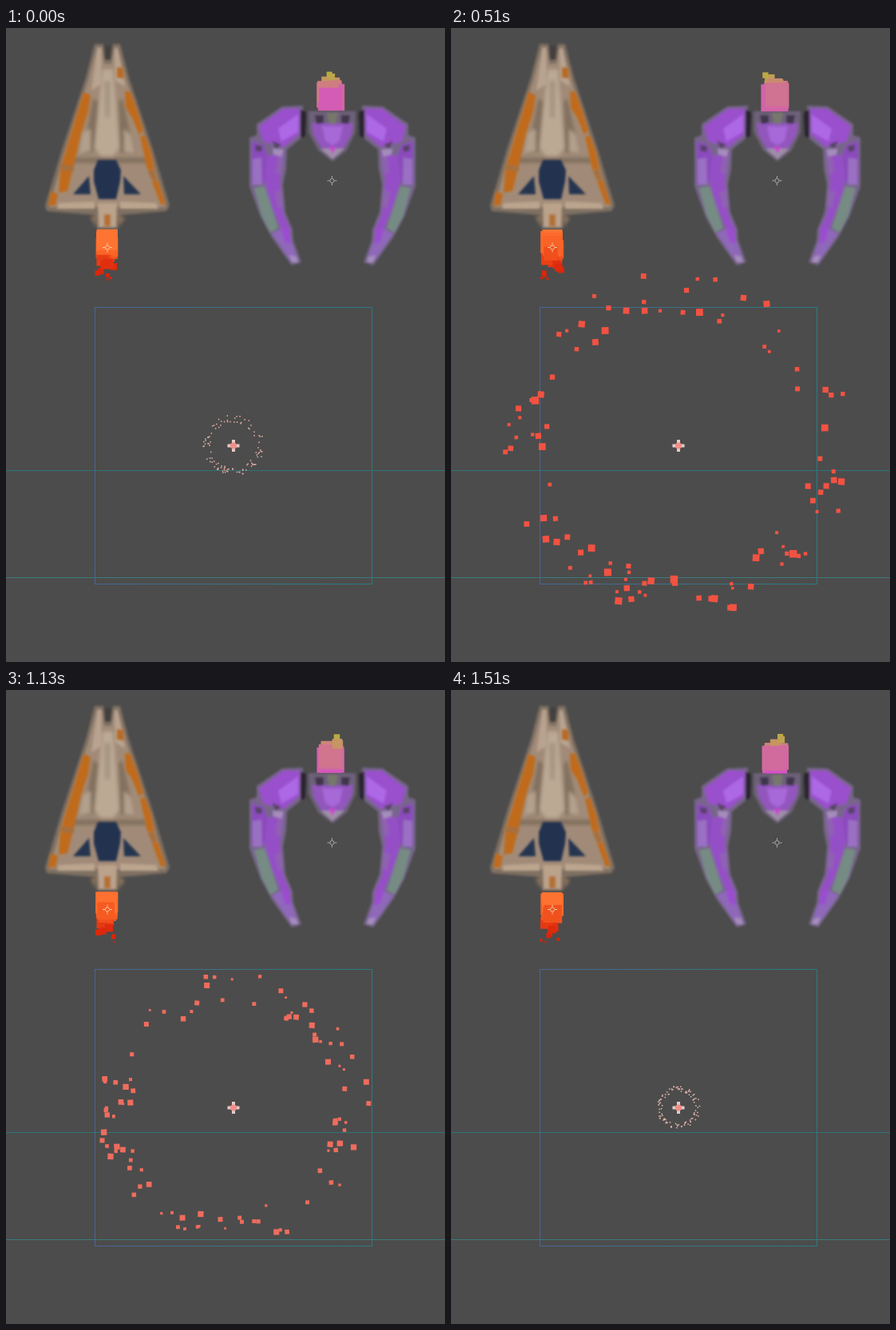
Animation of 550 by 793 pixels, one loop 1600 ms. Source, as an HTML page with a canvas:

```html
<!DOCTYPE html>
<html lang="en">
<head>
<meta charset="utf-8">
<title>Thrusters and burst</title>
<style>
  html, body { margin: 0; width: 100%; height: 100%; overflow: hidden; background: #4c4c4c; }
  svg, canvas { position: absolute; left: 0; top: 0; width: 550px; height: 793px; display: block; }
</style>
</head>
<body>
<svg viewBox="0 0 550 793">
  <defs>
    <filter id="soft" x="-10%" y="-10%" width="120%" height="120%"><feGaussianBlur stdDeviation="1.5"/></filter>
    <filter id="softer" x="-10%" y="-10%" width="120%" height="120%"><feGaussianBlur stdDeviation="2.2"/></filter>
    <linearGradient id="frame"><stop stop-color="#4a6796"/><stop offset=".5" stop-color="#3c7386"/><stop offset="1" stop-color="#267c84"/></linearGradient>
    <g id="arm">
      <path fill="#77658a" d="M305 137L314 134 314 120 346 98 372 97 372 136 352 152 351 176 347 196 350 230 359 252 360 266 370 293 358 297 333 262 319 236 305 198Z"/>
      <path fill="#9a50cc" d="M317 123L347 101 368 101 367 133 348 149 322 142Z"/>
      <path fill="#ad68e6" d="M341 126L366 108 366 130 345 142Z"/>
      <path fill="#8b4cbd" d="M308 142L322 146 328 160 326 192 308 194Z"/>
      <path fill="#9550c6" d="M328 160L348 156 343 190 347 232 357 254 349 262 334 226 324 194Z"/>
      <path fill="#9a70c3" d="M309 164L320 162 321 196 309 196Z"/>
      <path fill="#8e62b0" d="M341 158L348 158 345 184 338 180ZM337 206L345 202 347 222 341 226Z"/>
      <path fill="#768b84" d="M311 200L324 198 341 250 331 256 320 234Z"/>
      <path fill="#8f68ba" d="M333 257L347 250 358 268 366 291 357 292Z"/>
      <path fill="#9b4ed0" d="M344 250L355 254 357 270 349 267Z"/>
      <path fill="#a48dbb" d="M334 151L348 152 345 161 335 158ZM355 284L364 286 366 293 358 293Z"/>
      <path fill="#554263" d="M312 146L321 148 320 155 313 154ZM333 141L345 146 338 151Z"/>
      <path fill="#292332" d="M369 102L376 105 375 135 369 138Z"/>
    </g>
  </defs>

  <g filter="url(#soft)">
    <path fill="#7f6f62" d="M111 20L122 20 124 40 131 40 134 20 143 20 154 62 184 152 205 222 201 229 143 234 140 251 114 251 111 234 51 229 49 222 70 152 100 62Z"/>
    <path fill="#a18b78" d="M114 24L120 24 123 45 132 45 136 24 140 24 151 66 180 154 200 224 54 224 74 154 103 66Z"/>
    <path fill="#b8a390" d="M115 25L119 25 120 70 107 78ZM136 26L140 27 149 73 137 66Z"/>
    <path fill="#43403d" d="M123 22L132 22 131 40 124 40Z"/>
  </g>
  <g filter="url(#softer)">
    <path fill="#83715f" d="M109 88L116 92 110 155 94 158 102 126ZM141 92L146 88 153 120 162 158 143 156ZM78 162L176 162 178 169 76 169Z"/>
    <path fill="#bba994" d="M121 52L134 52 138 100 142 150 134 160 119 160 111 150 116 100Z"/>
    <path fill="#a69583" d="M123 66L131 66 130 112 124 112Z"/>
    <path fill="#b3a08c" d="M96 132L106 126 106 154 92 157ZM148 126L156 134 161 157 148 155Z"/>
    <path fill="#8e735a" d="M106 237L113 233 113 249ZM141 233L149 238 141 249Z"/>
  </g>
  <g filter="url(#soft)">
    <path fill="#c06b1b" d="M97 80L106 84 103 105 94 132 85 172 77 204 66 206 68 176 83 126ZM56 204L65 208 62 222 53 222Z"/>
    <path fill="#c06b1b" d="M149 79L156 80 164 102 172 128 167 134 158 112 150 100ZM168 136L174 134 182 156 186 178 177 177ZM183 192L190 190 200 220 194 221Z"/>
    <path fill="#b66a28" d="M139 49L147 50 148 63 139 62Z"/>
    <path fill="#a5703c" d="M68 170L86 173 84 180 67 177ZM177 178L186 178 190 190 183 191Z"/>
    <path fill="#233250" d="M115 165L138 165 144 178 143 192 138 214 116 214 110 192 110 178Z"/>
    <path fill="#263550" d="M84 208L104 185 106 208ZM147 185L169 208 148 208Z"/>
    <path fill="#bca58e" d="M66 219L111 217 111 226 64 226ZM143 217L188 219 191 226 143 226Z"/>
    <path fill="#bba28a" d="M115 219L139 219 138 249 116 249Z"/>
    <path fill="#b26f30" d="M123 233L131 233 131 248 123 248Z"/>
  </g>

  <g filter="url(#soft)">
    <use href="#arm"/>
    <use href="#arm" transform="translate(818) scale(-1 1)"/>
    <path fill="#6e6079" d="M379 104L438 104 438 130 427 153 409 167 391 153 379 130Z"/>
    <path fill="#9257bd" d="M383 119L435 119 433 133 423 150 409 154 395 150 385 133Z"/>
    <path fill="#a767d8" d="M396 123L422 123 418 141 409 147 400 141Z"/>
    <path fill="#40364b" d="M387 109L398 109 398 119 389 120ZM420 109L431 109 429 120 420 119Z"/>
    <path fill="#77776c" d="M402 106L416 106 413 120 405 120Z"/>
    <path fill="#9d8fa7" d="M394 151L424 151 409 164Z"/>
    <path fill="#cc45cf" d="M404 149L414 149 409 157Z"/>
  </g>

  <g fill="none" shape-rendering="crispEdges">
    <path stroke="#2d7376" d="M0 553.5H550"/>
    <path stroke="#3a7b7e" d="M0 687.5H550"/>
    <rect x="111.5" y="349.5" width="347" height="346" stroke="url(#frame)"/>
  </g>
</svg>

<canvas id="stage" width="550" height="793"></canvas>

<svg viewBox="0 0 550 793">
  <defs>
    <g id="aim" fill="none">
      <circle r="2.6"/>
      <path d="M-6 0H-3M3 0H6M0-6V-3M0 3V6"/>
    </g>
  </defs>
  <use href="#aim" x="127" y="274.5" stroke="#f0c4a0"/>
  <use href="#aim" x="408.5" y="191" stroke="#a2aaa6"/>
  <path stroke="#e3cbc7" stroke-width="4" d="M277.5 522.5H292.5M285 515V530"/>
  <circle cx="285" cy="522.5" r="4" fill="#f08d86"/>
</svg>

<script>
const LOOP = 1600;
const STEPS = [0, 70, 140, 220, 290, 370, 440, 510, 610, 680, 750,
  840, 910, 980, 1040, 1130, 1200, 1290, 1370, 1440, 1510];
const ctx = document.getElementById('stage').getContext('2d');

function seeded(seed) {
  return () => {
    seed = (seed + 0x6D2B79F5) | 0;
    let n = Math.imul(seed ^ (seed >>> 15), seed | 1);
    n ^= n + Math.imul(n ^ (n >>> 7), n | 61);
    return ((n ^ (n >>> 14)) >>> 0) / 4294967296;
  };
}

const mix = (a, b, k) => a + (b - a) * k;

// Blend along evenly spaced stops.
function along(stops, u) {
  const p = Math.min(Math.max(u, 0), 1) * (stops.length - 1);
  const i = Math.min(Math.floor(p), stops.length - 2);
  const a = stops[i], b = stops[i + 1], k = p - i;
  return Array.isArray(a) ? a.map((v, j) => mix(v, b[j], k)) : mix(a, b, k);
}

function square(x, y, size, color, turn = 0) {
  ctx.fillStyle = `rgb(${color.map(Math.round)})`;
  ctx.save();
  ctx.translate(x, y);
  ctx.rotate(turn);
  ctx.fillRect(-size / 2, -size / 2, size, size);
  ctx.restore();
}

// Each sector is 30 degrees, clockwise from the right.
function makeBurst(birth, seed, sectors) {
  const rnd = seeded(seed);
  const parts = sectors.flatMap((count, s) => Array.from({ length: count }, () => ({
    angle: (s + rnd()) * Math.PI / 6,
    speed: mix(0.264, 0.352, rnd()),
    size: mix(3.5, 9.5, rnd()),
    turn: mix(-0.1, 0.1, rnd())
  })));
  return { birth, parts };
}

const bursts = [
  makeBurst(-108, 11, [10, 9, 8, 14, 11, 6, 11, 6, 7, 8, 5, 5]),
  makeBurst(648, 29, [12, 4, 8, 8, 7, 14, 10, 3, 9, 4, 13, 7]),
  makeBurst(1433, 47, [8, 7, 8, 8, 9, 8, 9, 7, 9, 11, 8, 8])
];
const BURST_COLORS = [[228, 200, 188], [242, 82, 66]];

function drawBurst({ birth, parts }, t) {
  const age = t - birth;
  if (age < 0 || age > 750) return;
  const u = age / 618, color = along(BURST_COLORS, u);
  for (const p of parts) {
    const r = p.speed * age;
    square(285 + r * Math.cos(p.angle), 522 + r * Math.sin(p.angle),
      Math.max(1.5, p.size * u), color, p.turn * u);
  }
}

function makeFlame(spec) {
  const rnd = seeded(spec.seed);
  const gap = LOOP / spec.count;
  const parts = Array.from({ length: spec.count }, (_, i) => ({
    birth: (i + rnd()) * gap,
    side: mix(-1, 1, rnd()),
    depth: rnd(),
    scale: mix(0.88, 1.05, rnd())
  }));
  parts.sort((a, b) => a.depth - b.depth);
  return { ...spec, parts };
}

const flames = [
  makeFlame({
    seed: 5, count: 84, life: 430, x: 127,
    path: [264, 270, 280, 298, 316],
    spread: [1, 2, 4, 10, 15],
    sizes: [26, 26, 21, 10, 2],
    colors: [[255, 118, 52], [252, 104, 42], [242, 84, 30], [222, 42, 12], [214, 34, 8]]
  }),
  makeFlame({
    seed: 8, count: 40, life: 430, x: 407,
    path: [92, 87, 81, 68, 57],
    spread: [2, 2, 4, 10, 16],
    sizes: [25, 33, 29, 13, 7],
    colors: [[214, 76, 206], [210, 100, 168], [207, 122, 132], [198, 148, 100], [184, 174, 62]]
  })
];

function drawFlame(f, t) {
  for (const p of f.parts) {
    const u = ((t - p.birth + LOOP) % LOOP) / f.life;
    if (u < 1) {
      square(f.x + p.side * along(f.spread, u), along(f.path, u),
        along(f.sizes, u) * p.scale, along(f.colors, u));
    }
  }
}

function draw(now) {
  const clock = now % LOOP;
  const t = STEPS.findLast(s => s <= clock);
  ctx.clearRect(0, 0, 550, 793);
  flames.forEach(f => drawFlame(f, t));
  bursts.forEach(b => drawBurst(b, t));
}

const start = performance.now();
function tick() {
  draw(Math.max(0, performance.now() - start));
  requestAnimationFrame(tick);
}
tick();
</script>
</body>
</html>
```
